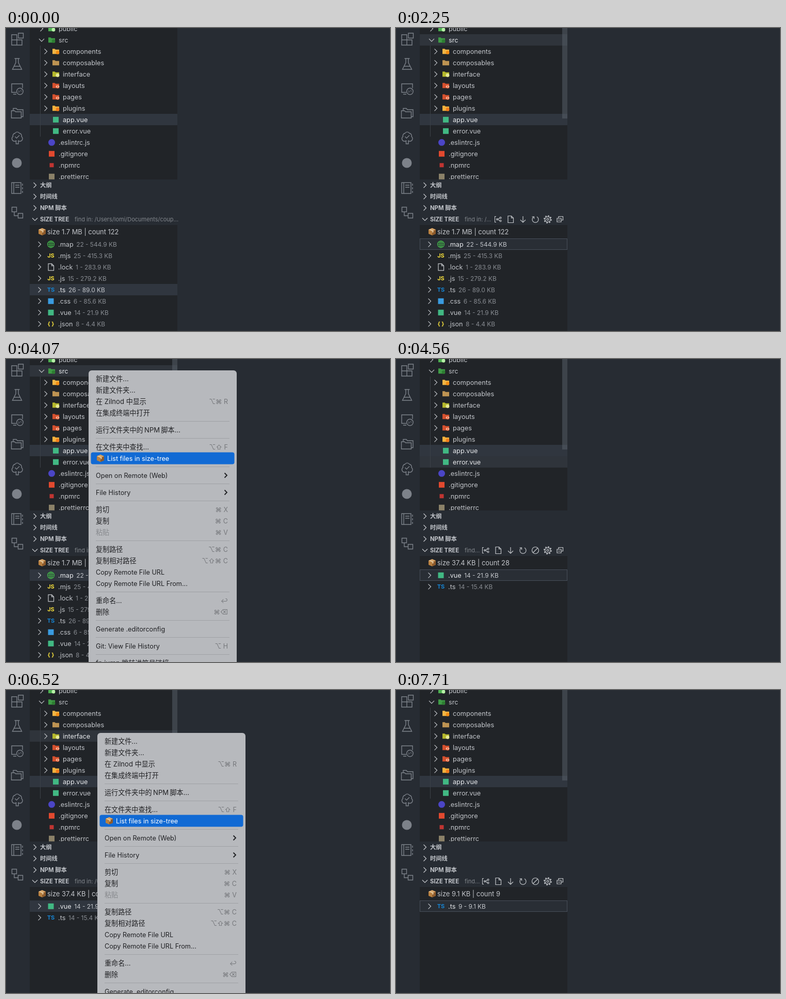
Write an HTML page that moves like this. It is 744 px wide and 586 px high and loops after 7990 ms.

```html
<!DOCTYPE html>
<html lang="zh-CN">
<head>
<meta charset="utf-8">
<style>
  html, body { margin: 0; width: 100%; height: 100%; overflow: hidden; background: #272c33; }
  svg { display: block; font-family: Inter, "Noto Sans CJK SC", "Noto Sans CJK", "DejaVu Sans", sans-serif; }
</style>
</head>
<body>
<svg id="stage" width="744" height="586" viewBox="0 0 744 586"></svg>
<script>
const stage = document.getElementById('stage');
const LOOP = 7990, TICK = 70;
const BG = '#272c33', SIDE = '#212428', SELECTED = '#30363f', HOVER = '#2f343b';
const TEXT = '#c2c5ca', BRIGHT = '#e6e8eb', DIM = '#878b91', GREY = '#7d828a';

// Drawing helpers
const rect = (x, y, w, h, fill, extra = '') =>
  `<rect x="${x}" y="${y}" width="${w}" height="${h}" fill="${fill}" ${extra}/>`;
const text = (x, y, s, fill = TEXT, size = 12.7, extra = '') =>
  `<text x="${x}" y="${y + size * .36}" fill="${fill}" font-size="${size}" ${extra}>${s}</text>`;
const line = (d, color = '#c5c8cc', width = 1.2) =>
  `<path d="${d}" fill="none" stroke="${color}" stroke-width="${width}"/>`;
const shape = (d, fill) => `<path d="${d}" fill="${fill}"/>`;
const dot = (x, y, r, fill) => `<circle cx="${x}" cy="${y}" r="${r}" fill="${fill}"/>`;
const ring = (x, y, r, color = '#c5c8cc', width = 1.2, extra = '') =>
  `<circle cx="${x}" cy="${y}" r="${r}" fill="none" stroke="${color}" stroke-width="${width}" ${extra}/>`;
const at = (x, y, s) => `<g transform="translate(${x} ${y})">${s}</g>`;
const square = (color, s = 11) => rect(-s / 2, -s / 2, s, s, color);
const chevron = (x, y, open) => at(x, y, line(open ? 'M-5-2.5l5 5 5-5' : 'M-2.5-5l5 5-5 5'));

const folder = (color, badge) =>
  shape('M-6.5-5h4.5l1.5 1.5H6.5V5H-6.5z', color) + (badge ? dot(3.5, 2, 3.4, badge) : '');
const codeFolder = folder('#d4502e', '#e4683f') + line('M2.8 0l-2 2 2 2M4.2 0l2 2-2 2', '#ffd5c6', 1.1);
const parcel = shape('M0-7L7-4V4L0 7-7 4V-4z', '#b9803f') + shape('M0-1L7-4V4L0 7z', '#8d5a2b') +
  shape('M0-7L7-4 0-1-7-4z', '#d6a468') + shape('M-4.5-5L2.5-2V1L.5 2V-1L-6-4z', '#e8cfa6');
const label = (s, color) => text(0, 0, s, color, 11, 'font-weight="700" text-anchor="middle"');
const page = line('M-5-6.5H1.5L5.5-2.5V6.5H-5zM1.5-6.5v4h4');
const globe = ring(0, 0, 6.5, '#43b04a') +
  '<ellipse rx="3" ry="6.5" fill="none" stroke="#43b04a"/>' +
  line('M0-6.5v13M-6.5 0h13M-5.5-3.5h11M-5.5 3.5h11', '#43b04a', 1);

const typeIcons = {
  '.map': globe, '.mjs': label('JS', '#f2dc3c'), '.lock': page, '.js': label('JS', '#f2dc3c'),
  '.ts': label('TS', '#1783d0'), '.css': square('#3a9be0'), '.vue': square('#41b883'), '.json': label('{ }', '#f2dc3c')
};

// Explorer rows: name, depth, icon, chevron state
const files = [
  ['public', 0, folder('#4caf50', '#b9f0a8'), 'shut'],
  ['src', 0, folder('#3f9b46', '#2e7d32'), 'open'],
  ['components', 1, folder('#f2b544', '#f38b12'), 'shut'],
  ['composables', 1, folder('#bd9352'), 'shut'],
  ['interface', 1, folder('#b4b82c', '#e6ea9a'), 'shut'],
  ['layouts', 1, codeFolder, 'shut'],
  ['pages', 1, codeFolder, 'shut'],
  ['plugins', 1, folder('#f5b13c', '#f37a1c'), 'shut'],
  ['app.vue', 1, square('#41b883')],
  ['error.vue', 1, square('#41b883')],
  ['.eslintrc.js', 0, dot(0, 0, 6.5, '#4b45c6')],
  ['.gitignore', 0, square('#e2492f')],
  ['.npmrc', 0, square('#c03532', 8)],
  ['.prettierrc', 0, square('#8b8168')]
];

function explorer(hover, scrollbar) {
  const rows = files.map(([name, depth, icon, fold], i) => {
    const y = 1.3 + 22 * i, x = 69 + 8 * depth, picked = i === 8;
    const back = picked ? SELECTED : i === hover ? HOVER : '';
    return (back ? rect(46, y - 11.3, 286, 22, back) : '') +
      (fold ? chevron(x, y, fold === 'open') : '') + at(x + 19.5, y, icon) +
      text(x + 33, y, name, picked || i === hover ? BRIGHT : TEXT);
  }).join('');
  return rect(46, 0, 286, 586, SIDE) + rows + rect(66, 34, 1, 176, '#3b4047') +
    (scrollbar ? rect(322, 0, 10, 175, '#5b626c', 'opacity=".5"') : '');
}

const actionIcons = {
  tree: line('M-4-5.5h-2.5v11H-4M-.5-.5L3-2.5M-.5.5L3 2.5', '#c5c8cc', 1.1) +
    ring(-2, 0, 1.3) + ring(4.5, -3, 1.5) + ring(4.5, 3, 1.5),
  page,
  down: line('M0-6V6M-5 1L0 6 5 1'),
  refresh: line('M-3-5A6 6 0 1 0 3-5M-6.5-5h4v4'),
  clear: ring(0, 0, 6.5) + line('M-4.5 4.5L4.5-4.5'),
  gear: ring(0, 0, 5.2) + ring(0, 0, 6.8, '#c5c8cc', 2, 'stroke-dasharray="2.7 2.64"') + ring(0, 0, 1.9),
  collapse: line('M-6-2h8v7h-8zM-3-2v-3.5h8.5v7H2M-4 1.5h4')
};

function sections(focused, filtered) {
  const titles = ['大纲', '时间线', 'NPM 脚本', 'SIZE TREE'];
  const names = Object.keys(actionIcons).filter(n => filtered || n !== 'clear');
  const path = !focused ? 'find in: /Users/lomi/Documents/coup...' : filtered ? 'find...' : 'find in: /...';
  return rect(46, 293, 286, 88, BG) +
    titles.map((s, i) => chevron(56, 304 + 22 * i, i === 3) +
      text(66, 304 + 22 * i, s, TEXT, 11.3, 'font-weight="700"')).join('') +
    text(133, 370, path, '#80858b', 11) +
    (focused ? names.map((n, i) => at(318 - 24 * (names.length - 1 - i), 370, actionIcons[n])).join('') : '');
}

const lists = {
  all: ['.map 22 - 544.9 KB', '.mjs 25 - 415.3 KB', '.lock 1 - 283.9 KB', '.js 15 - 279.2 KB',
    '.ts 26 - 89.0 KB', '.css 6 - 85.6 KB', '.vue 14 - 21.9 KB', '.json 8 - 4.4 KB'],
  src: ['.vue 14 - 21.9 KB', '.ts 14 - 15.4 KB'],
  interface: ['.ts 9 - 9.1 KB']
};

function sizeTree(list, summary, active, focused) {
  return at(70, 394, parcel) + text(80, 394.3, summary, TEXT, 12.9) +
    lists[list].map((entry, i) => {
      const y = 418.3 + 22 * i, on = i === active, [ext, ...info] = entry.split(' ');
      const back = !on ? '' : focused
        ? rect(46.5, 407.5, 285, 21, '#292e35', 'stroke="#474e59"')
        : rect(46, y - 11.3, 286, 22, SELECTED);
      const size = `<tspan dx="5.5" font-size="11.9" fill="${on ? TEXT : DIM}">${info.join(' ')}</tspan>`;
      return back + chevron(65, y, false) + at(87, y, typeIcons[ext]) + text(101, y, ext + size, on ? BRIGHT : TEXT);
    }).join('');
}

// Context menu: 'label|shortcut', '-' for a separator
const menuItems = ['新建文件...', '新建文件夹...', '在 Zilnod 中显示|⌥⌘ R', '在集成终端中打开', '-',
  '运行文件夹中的&thinsp;NPM&thinsp;脚本...', '-', '在文件夹中查找...|⌥⇧ F', 'List files in size-tree', '-',
  'Open on Remote (Web)|>', '-', 'File History|>', '-', '剪切|⌘ X', '复制|⌘ C', '粘贴|⌘ V', '-',
  '复制路径|⌥⌘ C', '复制相对路径|⌥⇧⌘ C', 'Copy Remote File URL', 'Copy Remote File URL From...', '-',
  '重命名...|↩', '删除|⌘⌫', '-', 'Generate .editorconfig', '-', 'Git: View File History|⌥ H', '-', 'fn jump 跳转进符号链接'];

function menu(left, top, active, opacity) {
  let y = 16;
  const rows = menuItems.map((item, i) => {
    if (item === '-') {
      y += 11;
      return rect(14, y - 17, 259, 1, '#9fa1a5');
    }
    const [name, key] = item.split('|'), on = i === active, boxed = name.startsWith('List');
    const color = on ? '#fff' : name === '粘贴' ? '#87898d' : '#202124';
    const row = (on ? rect(4.5, y - 11.5, 278, 23, '#116ad4', 'rx="4"') : '') +
      (boxed ? at(23, y, parcel) : '') +
      text(boxed ? 36 : 14, y, name, color, /[\u4e00-\u9fff]/.test(name) ? 13.1 : 12.65) +
      (key === '>' ? at(266, y, line('M-2.5-4.5l4.5 4.5-4.5 4.5', color, 1.9))
        : key ? text(270, y, key, on ? '#fff' : '#75777b', 12.5, 'text-anchor="end"') : '');
    y += 22;
    return row;
  }).join('');
  return `<g transform="translate(${left} ${top})" opacity="${opacity}">` +
    rect(0, 0, 287, 600, '#b7b9bd', 'rx="6"') + rows + '</g>';
}

const activityBar =
  line('M11 13h10v10h10v10H11zM11 23h10v10M24 10h9.5v9.5H24z', GREY, 1.4) +
  line('M16.5 59h10M19 59v8l-6.5 13h18L24 67v-8M15.5 74h12', GREY, 1.4) +
  line('M20 124.5H11V108h21v8M14 128h6', GREY, 1.4) + ring(27, 122.5, 6.2, GREY, 1.4) +
  line('M24 121l2 2-2 2M30 119.5l-2 2 2 2', GREY, 1) +
  line('M10.5 160h6l2 2h11v12h-19zM14 160v-4.5h6l2 2.5h11v13.5h-3.5', GREY, 1.4) +
  line('M19.5 219h-3a5 5 0 0 1-3-9 5 5 0 0 1 4-6.5 5 5 0 0 1 8.5 0 5 5 0 0 1 4 6.5 5 5 0 0 1-3 9h-3' +
    'M19.5 217v7H24v-7M17.5 210l3 3 5.5-5.5', GREY, 1.4) +
  dot(21, 261, 9.5, GREY) +
  line('M11 299h18v21H11zM15 299v21M18 304h8M18 308h8M32 301v4M32 308v4M32 315v4', GREY, 1.4) +
  line('M11.5 346.5h9v9h-9zM23.5 358.5h9v9h-9zM16 355.5v7.5h7.5', GREY, 1.4);

// Value of the last key at or before t
const pick = (t, keys) => keys.reduce((v, [time, value]) => t >= time ? value : v, keys[0][1]);

function scene(t) {
  const hover = pick(t, [[0, -1], [1620, 10], [1690, 5], [1760, 1], [4280, 9], [4910, 8], [4980, 7],
    [5050, 6], [5120, 5], [5260, 4], [7150, 12], [7710, -1]]);
  const actions = pick(t, [[0, false], [500, true], [2530, false], [4350, true], [5470, false], [7220, true]]);
  const list = pick(t, [[0, 'all'], [4350, 'src'], [7220, 'interface']]);
  const summary = pick(t, [[0, 'size 1.7 MB | count 122'], [4560, 'size 37.4 KB | count 28'], [7500, 'size 9.1 KB | count 9']]);
  const active = pick(t, [[0, 4], [640, -1], [1130, 0]]);
  const item = pick(t, [[0, -1], [3020, 0], [3090, 1], [3160, 2], [3230, 3], [3370, 5], [3440, 7], [3510, 8],
    [4000, -1], [4070, 8], [5470, -1], [5750, 1], [5960, 2], [6100, 3], [6240, 5], [6310, 7], [6450, 8],
    [6730, -1], [6800, 8]]);
  const opacity = pick(t, [[0, 0], [2530, 1], [4140, .65], [4210, .3], [4280, 0],
    [5470, 1], [7010, .65], [7080, .3], [7150, 0]]);
  const corner = t < 5000 ? [160, 22] : [177, 83];
  return rect(0, 0, 744, 586, BG) + activityBar + explorer(hover, t >= 1620) +
    sections(actions, list !== 'all') + sizeTree(list, summary, active, actions && t >= 1130) +
    (opacity ? menu(...corner, item, opacity) : '');
}

let shown = null;
function frame() {
  const t = performance.now() % LOOP;
  const step = Math.floor((t - 10) / TICK) * TICK + 10;
  if (step !== shown) stage.innerHTML = scene(shown = step);
  requestAnimationFrame(frame);
}
frame();
</script>
</body>
</html>
```
